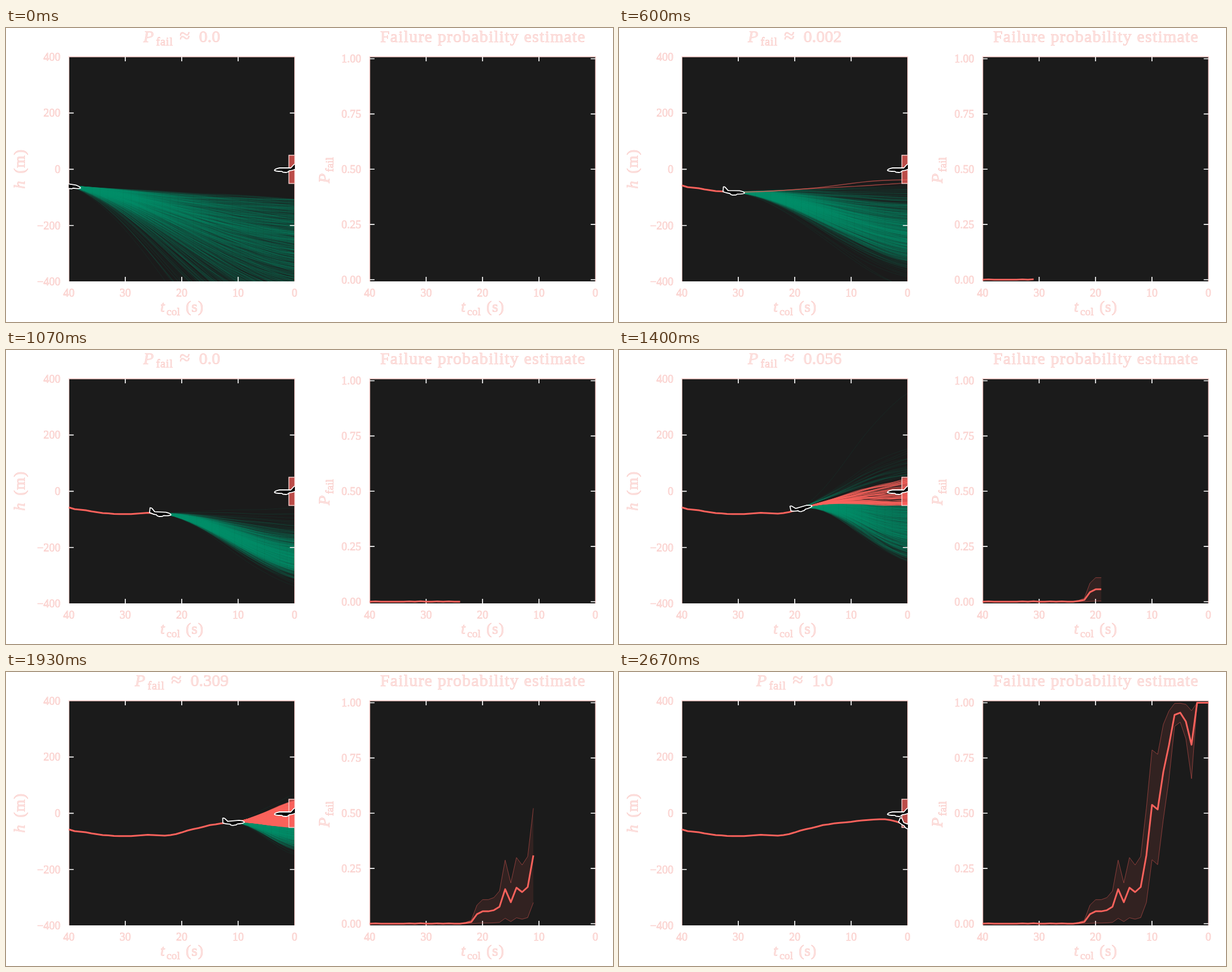
An HTML page with a canvas that plays this animation: 1074 px wide and 521 px high, repeating every 3.74 s.

```html
<!DOCTYPE html>
<html lang="en">
<head>
<meta charset="utf-8">
<title>Failure probability estimate</title>
<style>
  html, body { margin: 0; width: 100%; height: 100%; overflow: hidden; background: #fff; }
  canvas { position: absolute; left: 111px; top: 51px; background: #1b1b1b; }
  svg { position: absolute; left: 0; top: 0; }
  text { font-family: "Liberation Serif", "Times New Roman", serif; fill: #fde4e2; stroke: #f9c4c0; stroke-width: .6; white-space: pre; }
  .it { font-style: italic; }
  .red { fill: none; stroke: #fa625c; stroke-width: 3; stroke-linejoin: round; }
  .plane { fill: #000; stroke: #fff; stroke-width: 1.8; stroke-linejoin: round; }
</style>
</head>
<body>
<canvas id="fan" width="400" height="398"></canvas>
<svg width="1074" height="521" viewBox="0 0 1074 521">
  <defs>
    <clipPath id="clip"><rect x="111" y="51" width="400" height="398"/></clipPath>
    <path id="jet" d="M-17-.5 L-16.5-9 Q-14.5-9.5-13-8 L-8-2.5 Q2-2.5 12-2.5 Q20-1 21 1.5 Q20 3.6 8 3.6 L6 5 L0 5.5 L-3 4.5 L-5 2.6 Q-11 2-17-.5Z"/>
  </defs>
  <rect x="643" y="51" width="400" height="398" fill="#1b1b1b"/>
  <g id="axes"></g>
  <g clip-path="url(#clip)">
    <rect x="500.5" y="225.5" width="10.5" height="50" fill="#fa625c" fill-opacity=".72" stroke="#f5cfcc" stroke-width="1.5"/>
    <path id="track" class="red"/>
    <use href="#jet" class="plane" transform="translate(496 250.5) scale(-1 1)"/>
    <use href="#jet" class="plane" id="own"/>
  </g>
  <path id="band" fill="#fa625c" fill-opacity=".1"/>
  <path id="edges" class="red" style="stroke-width:.8;stroke-opacity:.6"/>
  <path id="prob" class="red"/>
  <g id="title"></g>
</svg>
<script>
const $ = id => document.getElementById(id);
const ctx = $('fan').getContext('2d');
const LOOP = 3740, LAST = 40, SAMPLES = 1000, DX = 9.98, RIGHT = 511;

// Flight path height (px) at each second
const path = [279, 282, 283, 284, 286, 287.5, 289, 289.5, 290.5, 290.7, 290.7, 290.7, 290, 289.3,
  288.5, 289, 289.5, 290, 289, 287.3, 284.3, 281, 278.5, 276.5, 274, 271.3, 270, 268.3, 267.3,
  266.5, 265.5, 264, 263, 262.3, 261.5, 261, 261, 262.5, 265, 268.5, 272];

// Failure probability: near zero at first, then rising
const early = { 1: .001, 7: .001, 9: .002, 12: .001, 14: .001 };
const late = [.003, .008, .043, .056, .056, .061, .077, .156, .097, .163, .143, .166, .309, .538,
  .517, .687, .807, .945, .955, .915, .81, 1, 1, 1];
const pFail = Array.from({ length: LAST + 1 }, (_, k) => k < 17 ? early[k] || 0 : late[k - 17]);

// Where rollouts end: [step, mean, spread, skew]
const ends = [[0, 405, 70, .2], [3, 375, 48, .15], [9, 363, 30, -.05], [16, 365, 20, -.08],
  [21, 306, 38, -.15], [29, 283, 17, -.1], [33, 271, 9, 0], [40, 271, 1, 0]];

const px = k => 111.3 + k * DX;
const qx = k => 643.7 + k * DX;
const qy = p => 446 - 391.5 * p;

function text(x, y, str, size, opt = {}) {
  const { anchor = 'start', cls = '', space = 0 } = opt;
  return `<text x="${x}" y="${y}" font-size="${size}" text-anchor="${anchor}" class="${cls}" letter-spacing="${space}">${str}</text>`;
}

function axes(left, labels, ys, xTitle) {
  const right = left + 399.5;
  let ticks = '', out = '';
  ys.forEach((y, i) => {
    if (y > 52 && y < 449) ticks += `M${left} ${y}h8.5M${right} ${y}h-8.5`;
    out += text(left - 15, y + 6.5, labels[i], 20, { anchor: 'end' });
  });
  for (let i = 0; i <= 4; i++) {
    const x = left + i * 99.8;
    if (i % 4) ticks += `M${x} 51v8M${x} 449v-8`;
    out += text(x, 475.5, 40 - 10 * i, 20, { anchor: 'middle' });
  }
  return `<path d="M${left} 449V51H${right}V449" fill="none" stroke="#fad0cd" stroke-width="1.4"/>
    <path d="${ticks}" stroke="#fff" stroke-width="1.7"/>` + out +
    text(xTitle, 503, 't', 28, { cls: 'it' }) + text(xTitle + 11, 509, 'col', 19.6) +
    text(xTitle + 45, 503, '(s)', 28, { space: .8 });
}

$('axes').innerHTML =
  axes(111.3, ['400', '200', '0', '−200', '−400'], [51.3, 150.7, 250.4, 350, 449.7], 273) +
  axes(643.6, ['1.00', '0.75', '0.50', '0.25', '0.00'], [1, .75, .5, .25, 0].map(qy), 805) +
  text(662, 24.5, 'Failure probability estimate', 30, { space: 1.15 }) +
  `<g transform="translate(33 285) rotate(-90)">${text(0, 0, 'h', 28, { cls: 'it' })}${text(27, 0, '(m)', 28, { space: 1 })}</g>` +
  `<g transform="translate(572 275) rotate(-90)">${text(0, 0, 'P', 28, { cls: 'it' })}${text(20, 6.5, 'fail', 19.6)}</g>`;

function random(seed) {
  let a = seed * 7919 + 17;
  return () => {
    a = a + 0x6D2B79F5 | 0;
    let t = Math.imul(a ^ a >>> 15, 1 | a);
    t = t + Math.imul(t ^ t >>> 7, 61 | t) ^ t;
    return ((t ^ t >>> 14) >>> 0) / 4294967296;
  };
}

function endStats(k) {
  const i = Math.max(1, ends.findIndex(e => e[0] >= k));
  const a = ends[i - 1], b = ends[i], f = (k - a[0]) / (b[0] - a[0]);
  return a.slice(1).map((v, j) => v + (b[j + 1] - v) * f);
}

function slope(k) {
  if (k === LAST) return (path[k] - path[k - 1]) / DX;
  return (path[k + 1] - path[Math.max(0, k - 1)]) / (2 * DX);
}

function drawFan(k) {
  ctx.setTransform(1, 0, 0, 1, -111, -51);
  ctx.clearRect(111, 51, 400, 400);
  const x0 = px(k), y0 = path[k], len = RIGHT - x0;
  if (len < 5) return;
  const [mean, sd, skew] = endStats(k);
  const rnd = random(k + 1);
  const fails = Math.round(pFail[k] * SAMPLES);
  const steps = Math.max(6, Math.ceil(len / 14));
  const m0 = slope(k) * len;
  for (let i = 0; i < SAMPLES; i++) {
    const fail = i >= SAMPLES - fails;
    const z = Math.sqrt(-2 * Math.log(1 - rnd())) * Math.cos(2 * Math.PI * rnd());
    let end = mean + sd * (z + skew * (z * z - 1));
    const r = rnd(), phase = rnd() * 6.28, freq = 5 + 5 * rnd();
    if (fail) end = 275 - Math.min(48, 3 * sd) * r ** 1.5;
    else if (end > 225 && end < 276) end = 551.5 - end;
    const d = end - y0, start = m0 + .25 * (end - mean) * !fail, stop = d * (.3 + .5 * r);
    ctx.beginPath();
    ctx.moveTo(x0, y0);
    for (let j = 1; j <= steps; j++) {
      const u = j / steps, v = 1 - u;
      const wave = .35 * sd * u * u * v * Math.sin(freq * u + phase);
      ctx.lineTo(x0 + len * u, y0 + d * u * u * (3 - 2 * u) + start * u * v * v - stop * u * u * v + wave);
    }
    ctx.strokeStyle = fail ? 'rgba(250,98,92,.58)' : 'rgba(14,150,108,.11)';
    ctx.lineWidth = fail ? 1.4 : 1;
    ctx.stroke();
  }
}

function line(k, x, y) {
  return Array.from({ length: k + 1 }, (_, i) => `${x(i).toFixed(1)} ${y(i).toFixed(1)}`);
}

function draw(k) {
  drawFan(k);
  $('track').setAttribute('d', 'M' + line(k, px, i => path[i]).join('L'));
  const angle = Math.atan(slope(k)) * 180 / Math.PI;
  $('own').setAttribute('transform', `translate(${px(k)} ${path[k]}) rotate(${angle})`);

  const hi = line(k, qx, i => qy(1 - (1 - pFail[i]) ** 2));
  const lo = line(k, qx, i => qy(pFail[i] ** 2));
  $('prob').setAttribute('d', 'M' + line(k, qx, i => qy(pFail[i])).join('L'));
  $('edges').setAttribute('d', k ? `M${hi.join('L')}M${lo.join('L')}` : '');
  $('band').setAttribute('d', `M${hi.concat(lo.reverse()).join('L')}Z`);

  const p = pFail[k], value = p % 1 ? String(p) : p.toFixed(1);
  const x = 243 - 7.5 * (value.length - 3);
  $('title').innerHTML = text(x, 24.5, 'P', 30, { cls: 'it' }) + text(x + 22.5, 31, 'fail', 21, { space: .5 }) +
    text(x + 64, 24.5, '≈', 34) + text(x + 98.5, 24.5, value, 30);
}

const t0 = performance.now();
let shown = -1;
function tick() {
  const t = (performance.now() - t0) % LOOP;
  const k = Math.min(LAST, Math.floor((t + 3.4) * 15 / 1000));
  if (k !== shown) draw(shown = k);
  requestAnimationFrame(tick);
}
tick();
</script>
</body>
</html>
```
